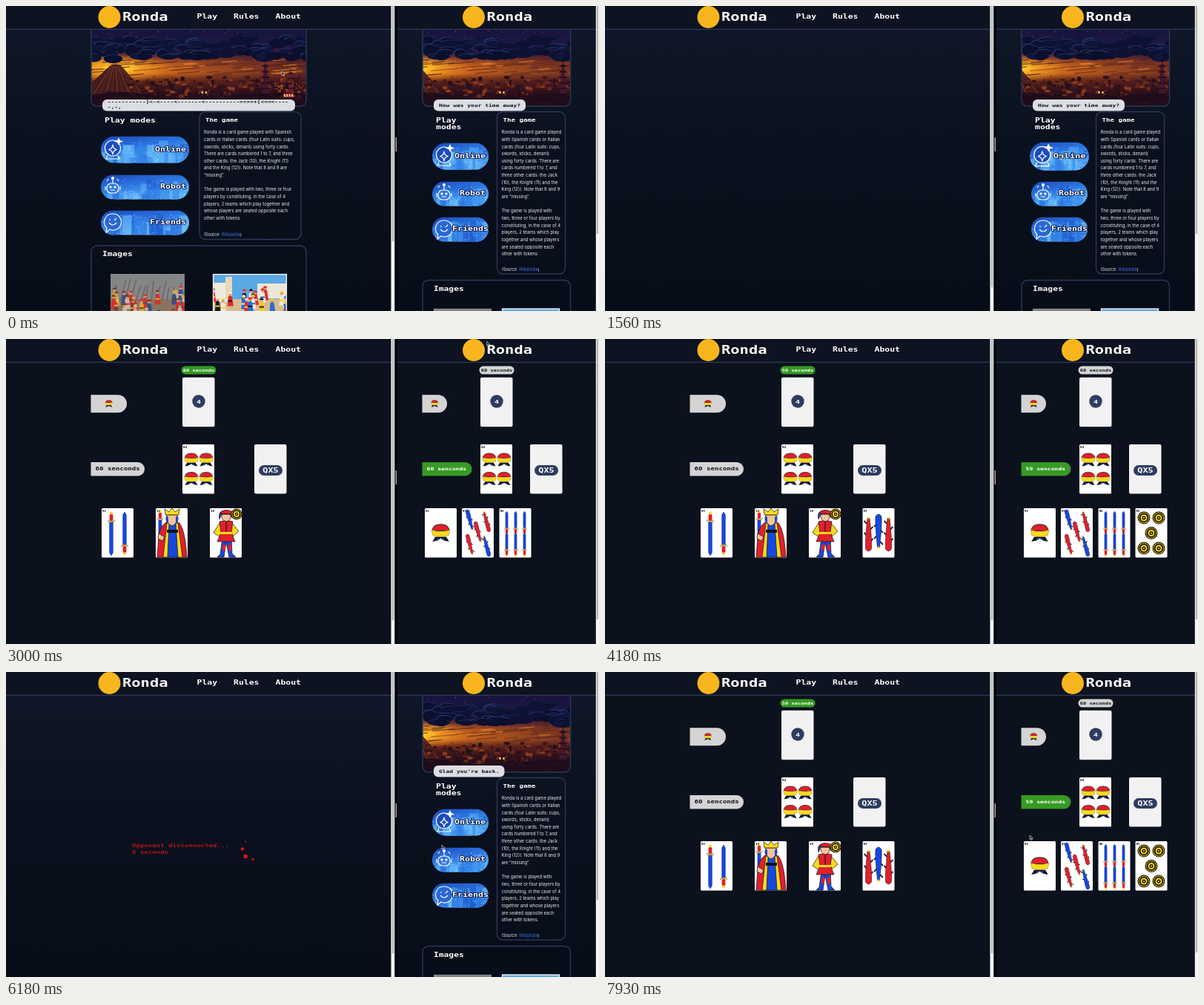
Animation of 800x411 px, one loop 8 s. Source, as an HTML page:

```html
<!DOCTYPE html>
<html lang="en">
<head>
<meta charset="utf-8">
<title>Ronda</title>
<style>
  html, body { margin: 0; width: 100%; height: 100%; overflow: hidden; background: #0b111d; }
  svg { display: block; width: 100vw; height: 100vh; }
  .px { font-family: "DejaVu Sans Mono", monospace; font-weight: bold; }
  .thin { font-weight: 400; }
  .body { font-family: Inter, sans-serif; font-size: 5.93px; fill: #eceef4; }
  .num { font: bold 5px "Liberation Serif", serif; fill: #000; }
  .out { paint-order: stroke; stroke: #0a1848; stroke-width: 1.6px; stroke-linejoin: round; }
</style>
</head>
<body>
<svg id="stage" viewBox="0 0 800 411" preserveAspectRatio="none"></svg>
<script>
const LOOP = 8000;
const LINE = '#2b3856', NAVY = '#2e3c60', GREEN = '#369a24', GREY = '#d4d4d4', INK = '#10131c';
const RED = '#e0202c', BLUE = '#1648e0', GOLD = '#fcd91c';

const rng = seed => () => (seed = (seed * 16807) % 2147483647) / 2147483647;
const many = (n, f) => Array.from({ length: n }, (_, i) => f(i)).join('');
const rect = (x, y, w, h, fill, more = '') => `<rect x="${x}" y="${y}" width="${w}" height="${h}" fill="${fill}" ${more}/>`;
const circ = (x, y, r, fill, more = '') => `<circle cx="${x}" cy="${y}" r="${r}" fill="${fill}" ${more}/>`;
const oval = (x, y, rx, ry, fill) => `<ellipse cx="${x}" cy="${y}" rx="${rx}" ry="${ry}" fill="${fill}"/>`;
const path = (d, fill, more = '') => `<path d="${d}" fill="${fill}" ${more}/>`;
const at = (x, y, s, turn = '', more = '') => `<g transform="translate(${x} ${y}) ${turn}" ${more}>${s}</g>`;

// Wide monospaced face; adv is the advance of one character.
const px = (x, y, s, adv, fill = '#fff', more = '', cls = '') =>
  `<text class="px ${cls}" transform="translate(${x} ${y}) scale(1.35 1)" font-size="${adv * 1.23}" fill="${fill}" ${more}>` +
  `${s.replace(/</g, '&lt;').replace(/>/g, '&gt;')}</text>`;
const MID = 'text-anchor="middle"';

const ramp = (id, stops, dir = 'x2="0" y2="1"') => `<linearGradient id="${id}" ${dir}>` +
  stops.map(([o, c]) => `<stop offset="${o}" stop-color="${c}"/>`).join('') + '</linearGradient>';

const defs = '<defs>' +
  ramp('bg', [[0, '#10182a'], [.45, '#0a111e'], [1, '#070d18']]) +
  ramp('sky', [[0, '#17133c'], [.22, '#1d1946'], [.34, '#5c2a32'], [.44, '#b4551e'], [.56, '#c4621c'], [.66, '#642618'], [.78, '#33121c'], [1, '#170a18']]) +
  ramp('city', [[0, '#1a48bc'], [.5, '#2f78e2'], [1, '#62b8fa']], 'x2=".5" y2="1"') +
  `<radialGradient id="sun"><stop stop-color="#ffe640"/><stop offset=".25" stop-color="#ffbe26"/><stop offset="1" stop-color="#f08a20" stop-opacity="0"/></radialGradient>
  <linearGradient id="dusk"><stop stop-color="#3a1024" stop-opacity="0"/><stop offset="1" stop-color="#3a1024" stop-opacity=".75"/></linearGradient>
  <pattern id="deck" width="3" height="3" patternUnits="userSpaceOnUse"><rect width="3" height="3" fill="#f5f5f5"/><path d="M0 0L3 3" stroke="#e2e2e2" stroke-width=".6"/></pattern>
  <pattern id="back" width="7" height="7" patternUnits="userSpaceOnUse"><rect width="7" height="7" fill="#15265f"/><path d="M0 3.5L3.5 0L7 3.5L3.5 7Z" fill="none" stroke="#34508c" stroke-width=".8"/><circle cx="3.5" cy="3.5" r="1" fill="#30487c"/></pattern>
</defs>`;

function pagoda(x, base, s, body, roof) {
  return at(x, base, many(5, i => {
    const w = 8 - i * 1.1, y = -i * 8;
    return rect(-w * .6, y - 8, w * 1.2, 8, body) + path(`M${-w - 2} ${y - 6}L${-w * .5} ${y - 9}H${w * .5}L${w + 2} ${y - 6}Z`, roof);
  }) + rect(-.5, -47, 1, 8, roof), `scale(${s})`);
}

function hero() {
  const r = rng(77);
  const pick = (...list) => list[Math.floor(r() * list.length)];
  return rect(0, 0, 290, 104, 'url(#sky)') +
    oval(34, 52, 80, 20, 'url(#sun)') + rect(110, 28, 180, 48, 'url(#dusk)') +
    many(30, () => rect(r() * 290, r() * 14, .8, .8, '#8a8cc8')) +
    many(70, () => at(r() * 300 - 20, 36 + r() * 26, rect(0, 0, 8 + r() * 34, 1.3, pick('#e8902c', '#5a241c', '#8c4020', '#441a20')), 'rotate(-5)', 'opacity=".65"')) +
    many(130, i => {
      const x = r() * 310 - 10, y = 11 + i * .19 + r() * 5, w = 5 + r() * 11, h = 2.5 + r() * 4;
      return (r() < .45 ? oval(x - .6, y - .9, w, h, pick('#222f66', '#1a2455', '#2c3a74')) : '') + oval(x, y, w, h, pick('#0a0f2c', '#0d1234', '#0b102e', '#10153a'));
    }) +
    path('M0 95V72L26 48Q33 45 40 48L78 92Z', '#421c1e') +
    many(9, i => path(`M${27 + i * 1.5} 49L${i * 9} 92`, 'none', `stroke="${i % 2 ? '#6e2c20' : '#8e4024'}" stroke-width=".9"`)) +
    many(230, i => oval(50 + r() * 242, 63 + i * .1 + r() * 5, 1 + r() * 3.4, 1 + r() * 2, pick('#6a2a1c', '#441718', '#2c1018', '#8c3c1e', '#341218', '#24101a'))) +
    pagoda(235, 86, .95, '#43182a', '#270e22') + pagoda(269, 92, .85, '#64202a', '#2b0e1e') +
    path('M0 104V88Q40 80 80 88T170 90T290 86V104Z', '#1f0c1a') +
    many(90, () => rect(r() * 290, 82 + r() * 21, 2 + r() * 6, 1, pick('#3c141f', '#150919', '#52202080', '#2a0f1c'))) +
    rect(259, 86, 14, 5, '#a8322c') + many(4, i => rect(260 + i * 3.4, 87, 1.6, 3, '#ffd08a')) +
    many(26, () => rect(245 + r() * 44, 70 + r() * 22, 1, 1.3, pick('#ffb648', '#e8503a', '#b04030'))) +
    many(2, i => rect(149 + i * 5, 83, 2, 3, '#ffd070'));
}

const ICON = 'stroke="#fff" stroke-width="1.2"';
const icons = [
  circ(0, -1, 10.5, '#1c4cc0') + path('M-7 9L-9 13.5H9L7 9M0 -5L1.5 -1L5 1L1.5 3L0 7L-1.5 3L-5 1L-1.5 -1Z', 'none') +
    path('M8 -14l1.5 3l3 1l-3 1l-1.500 3l-1.500 -3l-3 -1l3 -1z', '#fff'),
  rect(-8, -4, 16, 13, '#3478de', 'rx="6"') + path('M0 -4V-10M-8 -7L-6 -10M8 -7L6 -10M-10 0V5M10 0V5M-3 5H3', 'none') +
    circ(-3, 1, 1, '#fff') + circ(3, 1, 1, '#fff') + circ(0, -11, 1.5, '#fff'),
  path('M0 -11A11 11 0 1 1 -4 10L-9 14L-8 8A11 11 0 0 1 0 -11Z', '#2a68d4') + path('M-5 1Q0 7 5 1M-4 -4v2M5 -5L2 -2', 'none')
];

function button(id, i, x, y, w, h, tx) {
  const r = rng(31 + i * 19), clip = `clip-${id}`;
  return `<g id="${id}"><clipPath id="${clip}">${rect(x, y, w, h, '#000', `rx="${h / 2}"`)}</clipPath>
    <g clip-path="url(#${clip})">${rect(x, y, w, h, 'url(#city)')}
    ${many(24, () => { const bw = 5 + r() * 10, top = y + 4 + r() * h * .75;
      return rect(x + r() * w, top, bw, h, ['#1d5cd0', '#3585ea', '#58aef8', '#2468da', '#74c4fc'][Math.floor(r() * 5)], 'opacity=".6"'); })}
    ${many(90, () => rect(x + r() * w, y + 5 + r() * h, 1.5, 1, r() < .4 ? '#1a50c4' : '#8ad0ff', 'opacity=".6"'))}</g>
    ${at(x + 16, y + h / 2 - 1, icons[i], '', ICON)}
    ${px(tx, y + h / 2 + 2.2, ['Online', 'Robot', 'Friends'][i], 7, '#fff', 'text-anchor="end"', 'out')}</g>`;
}

function thumb(x, y, w, kind) {
  const r = rng(kind ? 90 : 41), h = 54, clip = `t${x}`;
  const tones = kind ? ['#e02a2a', '#f4cc2a', '#2a6cd0', '#f0e8da', '#1a1a24'] : ['#d0342c', '#d8a83a', '#34508c', '#7a3c2c', '#c8b8a0'];
  const tone = () => tones[Math.floor(r() * 5)];
  return `<clipPath id="${clip}">${rect(x, y, w, h, '#000')}</clipPath><g clip-path="url(#${clip})">
    ${rect(x, y, w, h, kind ? '#5aa8e4' : '#838587')}${rect(x, y + 34, w, 20, kind ? '#d8bc90' : '#8a7460')}
    ${kind ? rect(x, y + 12, 26, 26, '#f0eade') + rect(x + 17, y + 4, 9, 30, '#e8d8b8') + rect(x + 60, y + 13, 42, 20, '#ece6d8')
           : many(14, i => path(`M${x + 6 + i * 7} ${y + 36}l${2 + r() * 6} -${16 + r() * 14}`, 'none', 'stroke="#4a3c38" stroke-width=".6"'))}
    ${many(kind ? 20 : 30, i => { const fx = x + r() * w, fy = y + 17 + i + r() * 6;
      return path(`M${fx - 3.5} ${fy + 16}l1 -13q3 -3 5 0l2 13z`, tone()) + rect(fx - 3, fy + 8, 6, 2, tone()) +
        circ(fx, fy, 2.1, '#d39a70') + path(`M${fx - 3} ${fy - .5}q3 -6 6 0z`, tone()); })}
    </g>${kind ? rect(x + .6, y + .6, w - 1.2, h, 'none', 'stroke="#f4f4f4" stroke-width="1.4"') : ''}`;
}

const frame = (x, y, w, h) => rect(x, y, w, h, 'none', `rx="8" stroke="${LINE}" stroke-width="1.4"`);

function home(p) {
  const lines = p.copy.split('|');
  return `<clipPath id="hero-${p.id}">${rect(p.x, 20, p.w, 114.5, '#000', 'rx="9"')}</clipPath>
    <g clip-path="url(#hero-${p.id})">${at(p.hero, 32, hero())}</g>${frame(p.x, 20, p.w, 115)}
    <g id="bubble-${p.id}"></g>
    ${p.title.map((s, i) => px(p.bx + 5, 156.5 + i * 9.3, s, 6.9)).join('')}
    ${[[0, 36], [52, 33], [100, 33]].map(([dy, h], i) => button(p.id + i, i, p.bx, p.by + dy, p.bw, h, p.tx[i])).join('')}
    ${frame(p.box, 142.5, p.boxW, p.boxH)}${px(p.box + 8, 156.3, 'The game', 5.5)}
    <g class="body">${lines.map((s, i) => `<text x="${p.box + 6}" y="${172.2 + i * 9.65}">${s}</text>`).join('')}
    <text x="${p.box + 6}" y="${138.3 + p.boxH}" style="font-size:5.5px">(Source: <tspan fill="#3f6fe8">Wikipedia</tspan>)</text></g>
    ${frame(p.x, p.iy, p.w, 120)}${px(p.x + 15, p.iy + 14, 'Images', 6.8)}
    ${thumb(p.th[0], p.iy + 38, p.th[2], 0)}${thumb(p.th[1], p.iy + 38, p.th[2], 1)}`;
}

function bubble(x, w, rows) {
  const [top, adv] = rows.length > 1 ? [131.3, 4.7] : [135.6, 4.8];
  return rect(x, 126, w, 15.5, '#dcdee3', 'rx="6"') + rows.map((s, i) => px(x + 7, top + i * 7, s, adv, INK)).join('');
}

// Suit marks
const cup = (x, y, s) => at(x, y,
  path('M-9 -2Q-9 -9 0 -9Q9 -9 9 -2Z', RED, 'stroke="#111" stroke-width=".7"') +
  path('M-10 -3Q0 0 10 -3L8.500 3Q0 6.500 -8.500 3Z', GOLD, 'stroke="#553" stroke-width=".3"') +
  path('M-9 9.500L-6 4.500H6L9 9.500L4 8.500L0 6L-4 8.500Z', '#111') + rect(-4, 6, 3, 1.5, BLUE) + rect(1, 6, 3, 1.5, BLUE), `scale(${s})`);
const sword = (x, y, len, s, turn = 0) => at(x, y,
  path(`M-2.4 0V${len - 4}L0 ${len}L2.4 ${len - 4}V0Z`, BLUE, 'stroke="#0a1a60" stroke-width=".4"') +
  path('M-5 -2Q0 2 5 -2L3 1H-3Z', GOLD, 'stroke="#333" stroke-width=".4"') + rect(-2.4, -10, 4.8, 9, RED, 'rx="1.5"') + circ(0, -11.5, 2, GOLD),
  `rotate(${turn}) scale(${s})`);
const club = (x, y, s, c, turn = 0) => at(x, y,
  many(4, i => path(`M${i % 2 ? 2 : -2} ${-12 + i * 8}l${i % 2 ? 4 : -4} -4`, 'none', 'stroke="#222" stroke-width="1.8"')) +
  path('M-1.5 -20Q-5 12 -4 22Q0 28 4 22Q5 12 1.5 -20Z', c, 'stroke="#111" stroke-width=".5"') + circ(0, -20, 1.6, GOLD),
  `rotate(${turn}) scale(${s})`);
const coin = (x, y, r) => circ(x, y, r, '#191508') + circ(x, y, r * .8, 'none', `stroke="${GOLD}" stroke-width="${r * .15}" stroke-dasharray="1.5 .7"`) +
  circ(x, y, r * .52, GOLD) + circ(x, y, r * .3, '#191508') + circ(x, y, r * .13, GOLD);

const EDGE = 'stroke="#1a1010" stroke-width=".7"';
const king = sword(6, 15, 45, .9) +
  path('M14 19Q6 24 4 38L2 66H42Q40 30 32 20L23 16Z', RED, EDGE) + path('M15 20L10 66H17L23 30L28 66H36L30 20Z', GOLD, EDGE) +
  path('M18 20L16 66H30L27 20Z', BLUE, EDGE) + rect(15, 29, 15, 4, '#111') +
  path('M15 9Q13 20 22 24Q31 20 29 9Z', '#f2c49c', EDGE) + path('M14 10Q12 18 17 21V12ZM30 10Q32 18 27 21V12Z', '#2448b8') +
  path('M13 9L12 1L18 5L22 0L26 5L32 1L31 9Z', GOLD, EDGE) + path('M4 34L12 39L9 44L3 41Z', '#f2c49c', EDGE);
const jack = path('M17 40L14 62L10 66H19L22 46L26 66H35L30 61L29 40Z', BLUE, EDGE) +
  path('M13 20L5 33L14 39L17 29ZM30 20L39 31L31 38L28 28Z', GOLD, EDGE) +
  path('M13 18Q22 15 31 18L29 33L34 45H10L15 33Z', RED, EDGE) + rect(14, 32, 16, 3, GOLD) + path('M22 17V32', 'none', 'stroke="#111"') +
  rect(17, 49, 4, 8, RED) + rect(25, 49, 4, 8, RED) +
  path('M16 8H28Q29 17 22 18Q15 16 16 8Z', '#f2c49c', EDGE) + path('M13 15Q10 3 22 3Q32 4 30 13L27 8H16Z', BLUE, EDGE) + path('M13 7Q20 -1 31 5L29 8Z', RED, EDGE) + coin(36, 8, 7.5);

const faces = {
  '01': cup(21.5, 33, 1.25),
  '04': many(4, i => cup(12 + i % 2 * 20, 20.5 + (i >> 1) * 25.5, .95)),
  '02': sword(13, 18, 46, 1) + sword(31, 50, 45, 1, 180),
  '12': king,
  '10': jack,
  '03': many(3, i => club(8 + i * 13.5, 33, 1, i === 1 ? BLUE : RED, i === 1 ? 180 : 0)),
  '05': many(4, i => club(11 + i % 2 * 22, 17 + (i >> 1) * 33, .62, (i + (i >> 1)) % 2 ? RED : BLUE, i % 2 ? -15 : 165)) + club(22, 33, .62, RED, 165),
  '06': many(6, i => sword(10 + i % 3 * 12, i < 3 ? 27 : 56, 33, .7, 180)),
  '05c': many(4, i => coin(11.5 + i % 2 * 20, 13 + (i >> 1) * 41, 8.5)) + coin(21.5, 33.5, 8.5)
};
const card = (x, y, n) => at(x, y, rect(0, 0, 43, 66.5, '#fff', 'rx="1.5"') + faces[n] + `<text class="num" x="1" y="4.8">${n.slice(0, 2)}</text>`);
const plain = (x, y, fill) => rect(x, y, 43.5, 66.5, fill, 'rx="2"');
const tab = (x, y, w, h, fill) => path(`M${x} ${y}h${w - h / 2}a${h / 2} ${h / 2} 0 0 1 0 ${h}h${h / 2 - w}z`, fill);

function game(p, s) {
  const g = p.game, dy = s.dealt ? 0 : 75, mid = g.deck + 22;
  const label = `${s.top} seconds`, w = label.length * 4.25 + 4.5;
  return rect(p.pane[0], 32, p.pane[1], 379, '#0b111d') +
    rect(mid - w / 2, 36.5, w, 11, s.topOn ? GREEN : GREY, 'rx="5.5"') + px(mid, 44, label, 4.25, s.topOn ? '#fff' : INK, MID) +
    plain(g.deck, 51.7, 'url(#deck)') + circ(mid, 84, 8.7, NAVY) +
    (s.dealt ? px(mid, 86.6, '4', 6, '#fff', MID) : `<text class="px thin" x="${g.deck - .5}" y="124.5" font-size="6" fill="#e6e8ee">0</text>`) +
    tab(g.edge, 75.3 + dy, g.cap, 24, GREY) + (s.dealt ? cup(g.edge + g.cap / 2, 87, .5) : '') +
    tab(g.edge, 166 + dy, g.bar, 18.5, s.barOn ? GREEN : GREY) + px(g.edge + 6, 177.3 + dy, `${s.bar} senconds`, g.adv, s.barOn ? '#fff' : INK) +
    (s.dealt ? card(g.deck, 142, '04') : plain(g.deck, 217, 'url(#back)')) +
    plain(g.pile, 142 + dy, 'url(#deck)') + rect(g.pile + 6, 170 + dy, 32, 14, NAVY, 'rx="7"') + px(g.pile + 22, 180.1 + dy, 'QX5', 7.1, '#fff', MID) +
    g.hand.slice(0, s.dealt).map(([x, n]) => card(x, 228, n)).join('');
}

const L = {
  id: 'L', pane: [0, 519.5], x: 115, w: 290, hero: 115, title: ['Play modes'], bx: 128, by: 175.5, bw: 119, tx: [243, 243, 243],
  box: 261, boxW: 137, boxH: 172, iy: 323, th: [141, 279, 100],
  copy: 'Ronda is a card game played with Spanish|cards or Italian cards (four Latin suits: cups,|swords, sticks, denarii) using forty cards.|There are cards numbered 1 to 7, and three|other cards: the Jack (10), the Knight (11)|and the King (12)). Note that 8 and 9 are|“missing”.||The game is played with two, three or four|players by constituting, in the case of 4|players, 2 teams which play together and|whose players are seated opposite each|other with tokens.',
  game: { edge: 114.5, deck: 238, pile: 335, cap: 48.5, bar: 72.5, adv: 5.5, hand: [[129, '02'], [202, '12'], [275, '10'], [347.5, '03']] }
};
const R = {
  id: 'R', pane: [528, 267.5], x: 562, w: 199.5, hero: 516.5, title: ['Play', 'modes'], bx: 575, by: 184.5, bw: 76, tx: [647, 647, 651],
  box: 662.5, boxW: 92, boxH: 218.5, iy: 369.5, th: [577, 669, 78],
  copy: 'Ronda is a card game played|with Spanish cards or Italian|cards (four Latin suits: cups,|swords, sticks, denarii)|using forty cards. There are|cards numbered 1 to 7, and|three other cards: the Jack|(10), the Knight (11) and the|King (12)). Note that 8 and 9|are “missing”.||The game is played with|two, three or four players by|constituting, in the case of 4|players, 2 teams which play|together and whose players|are seated opposite each|other with tokens.',
  game: { edge: 561.5, deck: 640, pile: 707, cap: 33.5, bar: 67, adv: 4.9, hand: [[565, '01'], [615, '05'], [665.5, '06'], [715.5, '05c']] }
};

const brand = x => circ(x, 15, 15, '#f8b51e') + px(x + 17.5, 19.6, 'Ronda', 12.3);
const bar = (id, x, w) => rect(x, 0, w, 411, '#f7f7f7') + rect(x + w / 2 - 1, 0, 2.2, 317, '#b4b4b4', `id="bar-${id}"`);

document.getElementById('stage').innerHTML = defs + rect(0, 0, 800, 411, 'url(#bg)') +
  [L, R].map(p => `<g id="home-${p.id}">${home(p)}</g><g id="game-${p.id}"></g>`).join('') +
  `<g id="lost">${px(170, 236, 'Opponent disconnected...', 5.46, '#b3141e')}<g id="left"></g><g id="dots"></g></g>` +
  rect(0, 0, 800, 31, '#0d1320') + rect(0, 30.7, 800, 1.4, LINE) +
  brand(139.5) + brand(631) +
  px(257.5, 17.3, 'Play', 6.9) + px(307, 17.3, 'Rules', 6.9) + px(363.5, 17.3, 'About', 6.9) +
  bar('L', 519.5, 5) + rect(524.5, 0, 3.5, 411, '#05070b') + rect(525.7, 177, 1.2, 19, '#d0d0d0', 'rx=".6"') + bar('R', 795.8, 4.2) +
  path('M0 0V5.5L1.4 4.3L2.4 6.6L3.4 6.1L2.4 4H4.2Z', '#111', 'id="cursor" stroke="#fff" stroke-width=".6"');

const el = id => document.getElementById(id);
const show = (id, on) => el(id).setAttribute('display', on ? 'inline' : 'none');
const cache = {};
function fill(id, key, make) {
  if (cache[id] !== key) { cache[id] = key; el(id).innerHTML = make(); }
}

// Pointer stops: time, x, y
const track = [[0, 372, 88], [150, 365, 95], [620, 219, 187], [1000, 219, 187], [1480, 612, 200], [1750, 618, 202], [2200, 632, 197], [2500, 632, 197],
  [3100, 650, -12], [4600, 650, -12], [4980, 647, 299], [5600, 640, 285], [6150, 588, 240], [6260, 588, 205], [6900, 588, 208], [7800, 573, 220], [8000, 573, 220]];
function cursorAt(t) {
  const i = track.findIndex(k => k[0] > t), a = track[i - 1], b = track[i];
  const u = (t - a[0]) / (b[0] - a[0]), e = u * u * (3 - 2 * u);
  return [a[1] + (b[1] - a[1]) * e, a[2] + (b[2] - a[2]) * e];
}

function hover(p, t, from, to) {
  const ease = v => Math.max(0, Math.min(1, v / 120));
  const k = 1 + .05 * Math.min(ease(t - from), ease(to - t));
  const cx = p.bx + p.bw / 2, cy = p.by + 18;
  el(p.id + 0).setAttribute('transform', `translate(${cx} ${cy}) scale(${k}) translate(${-cx} ${-cy})`);
}

const code = ['-----------]<-<----<-------<---------->>>>+[<<<<----', '-,-,'];

function render(t) {
  const again = t >= 6420, playing = t >= 1750 && t < 4500 || again;
  const homeL = t < 1020, homeR = !playing, early = t < 3000;
  show('home-L', homeL);
  show('home-R', homeR);
  show('game-L', playing || t >= 4500 && t < 4560);
  show('game-R', playing);
  show('lost', t >= 4560 && !again);

  fill('bubble-L', 'code', () => bubble(130, 260, code));
  fill('bubble-R', early, () => early ? bubble(577, 124, ['How was your time away?']) : bubble(577, 95.5, ['Glad you’re back.']));
  hover(L, t, 540, 1200);
  hover(R, t, early ? 1420 : 6240, early ? 1900 : 6600);

  const dealt = t < 2700 ? 0 : again ? 4 : Math.min(4, 1 + Math.floor((t - 2700) / 130));
  const turn = t < 3700 || again && t < 7420 ? 60 : 59;
  const stateL = { dealt, top: dealt ? turn : t < 2260 ? 10 : 9, topOn: true, bar: 60, barOn: false };
  const stateR = { dealt, top: dealt ? 60 : t < 2400 ? 10 : 9, topOn: !dealt, bar: dealt ? turn : 60, barOn: dealt > 0 };
  fill('game-L', JSON.stringify(stateL), () => game(L, stateL));
  fill('game-R', JSON.stringify(stateR), () => game(R, stateR));

  const secs = t < 5650 ? 10 : 9;
  fill('left', secs, () => px(170, 244.5, `${secs} seconds`, 5.46, '#b3141e'));
  const head = 82 + (t - 5000) * .36;
  el('dots').innerHTML = many(8, i => {
    const a = i * Math.PI / 4, gap = Math.abs(((i * 45 - head) % 360 + 540) % 360 - 180);
    return circ(333 + 14 * Math.cos(a), 238.5 + 14 * Math.sin(a), 3.2 * Math.max(0, 1 - gap / 115), '#d0141e');
  });

  el('bar-L').setAttribute('height', homeL ? 317 : 379);
  el('bar-R').setAttribute('height', homeR ? 307 : 378);
  el('cursor').setAttribute('transform', `translate(${cursorAt(t).join(' ')})`);
}

const start = performance.now();
function tick() {
  render((performance.now() - start) % LOOP);
  requestAnimationFrame(tick);
}
render(0);
requestAnimationFrame(tick);
</script>
</body>
</html>
```
